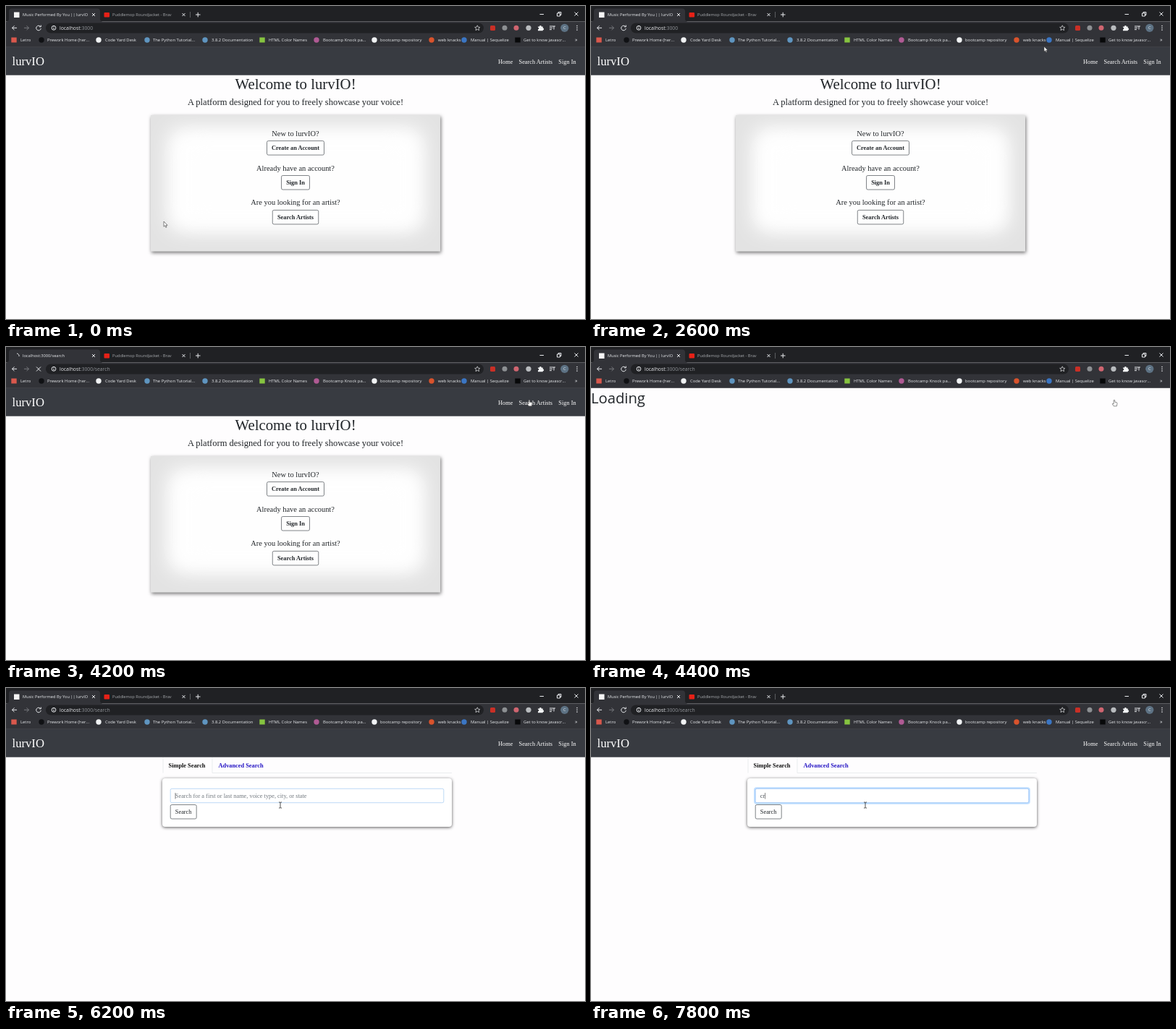
Recreate the animation shown at these times as an HTML page. Size 800 by 433 pixels, loop 8 s.

```html
<!DOCTYPE html>
<html lang="en">
<head>
<meta charset="utf-8">
<title>Browser walkthrough</title>
<style>
  html, body { margin: 0; width: 100%; height: 100%; overflow: hidden; background: #fefdfe; }
  svg { display: block; width: 800px; height: 433px; }
  text { white-space: pre; }
  .ui { font-family: "Open Sans", "Noto Sans", sans-serif; }
  .page { font-family: "Liberation Serif", serif; fill: #212529; }
  .mid { text-anchor: middle; }
  .bold { font-weight: 700; }
  .line { fill: none; stroke: #e8eaed; stroke-width: 1; }
  .btn { fill: #fefefe; stroke: #4a4f55; stroke-width: .7; }
  #panel { filter: drop-shadow(1.5px 2px 2.5px rgba(0,0,0,.55)); }
  #searchCard { filter: drop-shadow(0 1px 2px rgba(0,0,0,.65)); }
</style>
</head>
<body>
<svg viewBox="0 0 800 433" xmlns="http://www.w3.org/2000/svg">
  <defs>
    <filter id="soft" x="-20%" y="-30%" width="140%" height="160%"><feGaussianBlur stdDeviation="13"/></filter>
    <clipPath id="panelClip"><rect x="200" y="151" width="400" height="188.5"/></clipPath>
    <linearGradient id="tabFade">
      <stop offset=".88" stop-color="#202124" stop-opacity="0"/>
      <stop offset="1" stop-color="#202124"/>
    </linearGradient>
  </defs>
  <rect width="800" height="433" fill="#fefdfe"/>

  <g id="home" class="page">
    <rect id="panel" x="200" y="151" width="400" height="188.5" fill="#e3e3e3"/>
    <g clip-path="url(#panelClip)">
      <rect x="223" y="168" width="355" height="145" rx="20" fill="#fff" filter="url(#soft)"/>
      <rect x="240" y="184" width="322" height="116" rx="22" fill="#fefefe" filter="url(#soft)"/>
    </g>
  </g>

  <g id="search" class="page">
    <path d="M217 117.5V96M285 96V117.5H616" fill="none" stroke="#e3e6e9" stroke-width=".7"/>
    <rect id="searchCard" x="216" y="125" width="400" height="67" rx="4" fill="#fff"/>
    <rect id="ring" x="226" y="138.2" width="379.8" height="21.6" rx="2.8" fill="none" stroke="#bfdeff" stroke-width="1.9"/>
    <rect id="input" x="227.2" y="139.3" width="377.6" height="19.4" rx="2" fill="#fff" stroke-width=".7"/>
    <path id="caret" d="M0 145V153.5" stroke="#333" stroke-width=".6"/>
    <rect class="btn" x="227.2" y="161.5" width="36" height="19.5" rx="2"/>
  </g>

  <g id="navbar" class="page">
    <rect y="56" width="800" height="39.7" fill="#383b41"/>
  </g>

  <text id="loading" class="ui" x="0" y="78.2" font-size="20.2" font-weight="500" fill="#212529">Loading</text>

  <g id="chrome" class="ui">
    <rect width="800" height="21.5" fill="#202124"/>
    <path d="M0 21.5Q4 21.5 4 17.5V7.5Q4 3.5 8 3.5H126Q130 3.5 130 7.5V17.5Q130 21.5 134 21.5H800V56.5H0Z" fill="#323338"/>
    <rect x="55" y="23.5" width="605" height="14" rx="7" fill="#202124"/>
    <path d="M0 56.5H800" stroke="#44464a" stroke-width=".7"/>

    <rect id="favicon" x="11" y="8.5" width="7.5" height="7.5" fill="#f4f4f4"/>
    <path id="spinner" class="line" d="M15 9A3.3 3.3 0 0 1 18 13"/>
    <rect x="135.5" y="9" width="7.5" height="6.5" rx="1" fill="#e62117"/>

    <g class="line" stroke-width=".8">
      <path d="M119 10l4 4m0-4l-4 4M243.500 10l4 4m0-4l-4 4M262 12h6.500M265.200 8.800v6.500"/>
      <path d="M737.500 11.500h5.500M761.500 10h4v4h-4zM763 10v-1.500h4v4h-1.500M785.500 8.500l5 5m0-5l-5 5"/>
      <path d="M254.500 8V16" stroke="#5b5d61"/>
      <path d="M15 30.300H8.500m3-3l-3 3 3 3"/>
      <path d="M25 30.300h6.500m-3-3l3 3-3 3" stroke="#77797d"/>
      <path id="reload" d="M47.500 28.300A3.300 3.300 0 1 0 48.300 31M48.300 26.500v2.300H46"/>
      <path id="stop" d="M42 27.500l6 6m0-6l-6 6"/>
      <circle cx="66" cy="30.300" r="2.900"/>
      <path d="M66 29.800v2.200M66 28.300v.7"/>
      <path d="M651.300 26.800l1.100 2.400 2.500.2-1.900 1.700.6 2.500-2.300-1.300-2.300 1.300.6-2.500-1.900-1.700 2.500-.2z" stroke-width=".7"/>
      <path d="M751 28h6M751 30.300h4M751 32.600h3M757 28v4.500m0-4.500h2"/>
    </g>
    <rect x="669" y="27" width="7" height="7" rx="1.500" fill="#c92f26"/>
    <circle cx="689" cy="30.300" r="3.500" fill="#8d9093"/>
    <circle cx="705" cy="30.300" r="3.500" fill="#cf6570"/>
    <circle cx="722" cy="30.300" r="3.600" fill="#b9bcbf"/>
    <path d="M735 28.500h2a1.400 1.400 0 1 1 2.800 0h2v2a1.400 1.400 0 1 1 0 2.800v1h-6.800v-2a1.300 1.300 0 1 0 0-2.600z" fill="#f1f3f4"/>
    <circle cx="771.800" cy="30.300" r="5.600" fill="#5d7284"/>
    <g fill="#e8eaed"><circle cx="789" cy="27.500" r=".8"/><circle cx="789" cy="30.300" r=".8"/><circle cx="789" cy="33.100" r=".8"/></g>
  </g>

  <g id="cursor">
    <path id="arrow" d="M0 0V7.200L1.700 5.700 2.800 8.300 4 7.800 2.900 5.300H5.100Z" fill="#fff" stroke="#333" stroke-width=".6"/>
    <path id="hand" d="M-.8 .7Q0-.5.8.7V3.200L3.300 3.700Q4.200 4 4 5.200L3.400 8.800H-.8L-2.700 5.800Q-2.600 4.600-.8 5.700Z" fill="#fff" stroke="#444" stroke-width=".6"/>
    <path id="beam" d="M-2-4H-.5L0-3.500 .5-4H2M0-3.500V3.500M-2 4H-.5L0 3.500 .5 4H2" fill="none" stroke="#222" stroke-width=".8"/>
  </g>
</svg>
<script>
const LOOP = 8000, STEP = 200, BRAND = "lurvIO";
const $ = id => document.getElementById(id);

function add(parent, tag, attrs, content = "") {
  const el = document.createElementNS("http://www.w3.org/2000/svg", tag);
  for (const key in attrs) el.setAttribute(key, attrs[key]);
  el.textContent = content;
  return $(parent).appendChild(el);
}
const label = (parent, x, y, size, content, attrs = {}) =>
  add(parent, "text", { x, y, "font-size": size, ...attrs }, content);

// Browser frame
const tabTitle = label("chrome", 23, 14.2, 5.7, "", { fill: "#e8eaed" });
label("chrome", 147, 14.2, 5.7, "Puddlemop Roundjacket - Brav", { fill: "#a5a8ac" });
add("chrome", "rect", { x: 146, y: 7, width: 92, height: 10, fill: "url(#tabFade)" });
add("chrome", "rect", { x: 238, y: 7, width: 4.5, height: 10, fill: "#202124" });
const address = label("chrome", 74, 32.7, 6.85, "localhost", { fill: "#e8eaed" });
const path = document.createElementNS(address.namespaceURI, "tspan");
path.setAttribute("fill", "#92959a");
address.append(path);
label("chrome", 771.8, 32.4, 6, "C", { class: "mid", fill: "#dfe5ea" });

const bookmarks = [
  [11, "#d9584c", "Letro", 20],
  [49, "#101114", "Prework Home (her...", 57],
  [128, "#f1f3f4", "Code Yard Desk", 137],
  [195, "#5f95c0", "The Python Tutorial...", 203],
  [275, "#5f95c0", "3.8.2 Documentation", 284],
  [354, "#86c440", "HTML Color Names", 363],
  [429, "#b05a94", "Bootcamp Knock pa...", 438],
  [509, "#f1f3f4", "bootcamp repository", 517],
  [588, "#d9532c", "web knacks", 597],
  [633, "#3b76c4", "Manual | Sequelize", 642],
  [707, "#08090a", "Get to know javascr...", 715]
];
bookmarks.forEach(([cx, fill, name, x], i) => {
  if ([0, 5, 10].includes(i))
    add("chrome", "rect", { x: cx - 3.7, y: 43.5, width: 7.4, height: 7, fill });
  else
    add("chrome", "circle", { cx, cy: 47, r: 3.7, fill });
  label("chrome", x, 49.2, 5.88, name, { fill: "#e8eaed" });
});
label("chrome", 786, 49.2, 7, "»", { fill: "#e8eaed" });

// Site header
label("navbar", 8.5, 82.2, 16.67, BRAND, { fill: "#fff" });
[[680, "Home"], [708.5, "Search Artists"], [763.3, "Sign In"]].forEach(([x, name]) =>
  label("navbar", x, 79.5, 8.33, name, { fill: "#fff" }));

// Welcome page
const mid = { class: "mid" };
label("home", 400, 115.2, 20.83, `Welcome to ${BRAND}!`, mid);
label("home", 400, 136.6, 12.5, "A platform designed for you to freely showcase your voice!", mid);
[
  [`New to ${BRAND}?`, "Create an Account", 79],
  ["Already have an account?", "Sign In", 39],
  ["Are you looking for an artist?", "Search Artists", 63.5]
].forEach(([question, action, width], i) => {
  const y = 179.6 + i * 47.9;
  label("home", 400, y, 10.42, question, mid);
  add("home", "rect", { class: "btn", x: 400 - width / 2, y: y + 7, width, height: 19.5, rx: 2 });
  label("home", 400, y + 19.7, 8.33, action, { class: "mid bold" });
});

// Search page
label("search", 224.5, 109.5, 8.33, "Simple Search", { class: "bold", fill: "#111" });
label("search", 293.5, 109.5, 8.33, "Advanced Search", { class: "bold", fill: "#2414c4" });
label("search", 233.8, 174, 8.33, "Search");
const entry = label("search", 233.8, 151.8, 8.33, "");

const route = [
  [0, 218, 298], [1400, 218, 298], [2000, 430, 170], [2600, 626, 56],
  [3200, 723, 73], [4900, 723, 73], [5400, 500, 150], [5800, 379, 162], [LOOP, 379, 162]
];
function pointerAt(t) {
  const i = route.findIndex(([end]) => t < end);
  const [t0, x0, y0] = route[i - 1], [t1, x1, y1] = route[i];
  const u = (t - t0) / (t1 - t0), k = u * u * (3 - 2 * u);
  return [x0 + (x1 - x0) * k, y0 + (y1 - y0) * k];
}

const show = (id, on) => { $(id).style.display = on ? "" : "none"; };

function draw(t) {
  const waiting = t >= 4200 && t < 4400;
  const loading = t >= 4400 && t < 4600;
  const focused = t >= 6200;
  const typed = t < 7600 ? "" : t < 7800 ? "c" : "cr";

  show("home", t < 4400);
  show("search", t >= 4600);
  show("navbar", !loading);
  show("loading", loading);
  show("favicon", !waiting);
  show("spinner", waiting);
  show("reload", !waiting);
  show("stop", waiting);
  tabTitle.textContent = waiting ? "localhost:3000/search" : `Music Performed By You || ${BRAND}`;
  path.textContent = t < 4200 ? ":3000" : ":3000/search";

  show("ring", t >= 6400);
  $("input").setAttribute("stroke", t >= 6400 ? "#80b5f5" : focused ? "#a3cbf2" : "#ced4da");
  entry.textContent = typed || "Search for a first or last name, voice type, city, or state";
  entry.style.fill = typed ? "#495057" : "#72797f";
  show("caret", focused && (typed || (t - 6200) % 1000 < 500));
  $("caret").setAttribute("transform", `translate(${[234, 237.7, 240.6][typed.length]} 0)`);

  const hand = t >= 3200 && t < 5200, beam = t >= 5800;
  show("hand", hand);
  show("beam", beam);
  show("arrow", !hand && !beam);
  $("cursor").setAttribute("transform", `translate(${pointerAt(t)})`);
}

const start = performance.now();
function tick(now) {
  const t = Math.max(0, now - start) % LOOP;
  draw(Math.floor(t / STEP) * STEP);
  requestAnimationFrame(tick);
}
draw(0);
requestAnimationFrame(tick);
</script>
</body>
</html>
```
